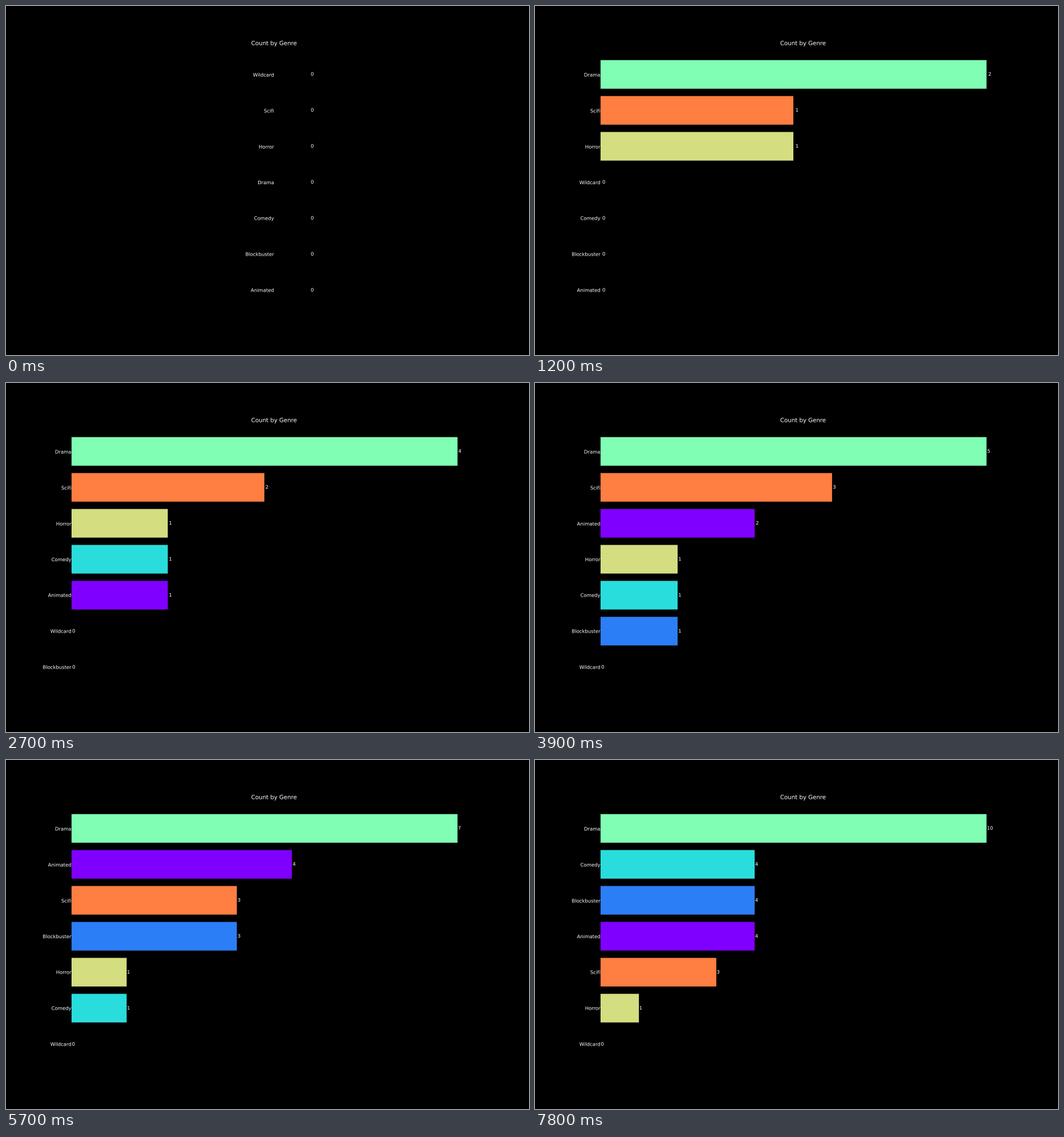
These frames come from a looping animation (917x611 px, 8 s). An HTML page with a canvas:

```html
<!DOCTYPE html>
<html lang="en">
<head>
<meta charset="utf-8">
<title>Count by Genre</title>
<style>
  html, body { margin: 0; width: 100%; height: 100%; overflow: hidden; background: #000; }
  canvas { display: block; width: 100vw; height: 100vh; }
</style>
</head>
<body>
<canvas id="chart" width="917" height="611"></canvas>
<script>
const canvas = document.getElementById('chart');
const view = canvas.getContext('2d');
const FONT = '"DejaVu Sans", Verdana, sans-serif';
const STEP = 300, LOOP = 8000;

// Drawn at double size, then halved for even antialiasing.
const buffer = document.createElement('canvas');
buffer.width = canvas.width * 2;
buffer.height = canvas.height * 2;
const ctx = buffer.getContext('2d');

// Layout in a 1500 x 1000 figure at 100 dpi.
const FIG_W = 1500, FIG_H = 1000, PT = 100 / 72;
const LEFT = 187.5, WIDTH = 1162.5, TOP = 120, HEIGHT = 770;
const ROW = HEIGHT / 7.48, BAR = 0.8 * ROW, FIRST = TOP + 0.74 * ROW;
const MID = LEFT + WIDTH / 2, GAP = 0.01;

const genres = [
  ['Animated', '#8000ff'], ['Blockbuster', '#2c7ef7'], ['Comedy', '#2adddd'],
  ['Drama', '#80ffb4'], ['Horror', '#d4dd80'], ['Scifi', '#ff7e41'], ['Wildcard', '#ff0000']
].map(([name, color]) => ({ name, color }));

// Each step adds one entry, given by the genre's initial.
const ENTRIES = 'DSDHCDSADSADBADBADBBDCDCDC';

function ranking(step) {
  const seen = ENTRIES.slice(0, step);
  return genres
    .map(g => ({ ...g, count: seen.split(g.name[0]).length - 1 }))
    .reverse()
    .sort((a, b) => b.count - a.count);
}

function text(str, x, y, align, points = 10) {
  ctx.font = `${points * PT}px ${FONT}`;
  ctx.textRendering = 'geometricPrecision';
  ctx.letterSpacing = '0.01px'; // keeps "fi" from joining
  ctx.textAlign = align;
  ctx.fillStyle = '#fff';
  ctx.fillText(str, x, Math.round(y));
}

function bar(x0, x1, y0, y1, color) {
  const [l, r, t, b] = [x0, x1, y0, y1].map(Math.round);
  ctx.fillStyle = color;
  ctx.fillRect(l, t, r - l, b - t);
}

function draw(step) {
  const rows = ranking(step);
  const max = rows[0].count;
  const zero = max ? LEFT : MID;
  const unit = max ? WIDTH / 1.05 / max : WIDTH / 0.11;

  ctx.setTransform(buffer.width / FIG_W, 0, 0, buffer.height / FIG_H, 0, 0);
  ctx.fillStyle = '#000';
  ctx.fillRect(0, 0, FIG_W, FIG_H);

  text('Count by Genre', MID, TOP - 6 * PT, 'center', 12);
  rows.forEach(({ name, color, count }, i) => {
    const y = FIRST + i * ROW;
    const end = zero + count * unit;
    if (count) bar(zero, end, y - BAR / 2, y + BAR / 2, color);
    text(name, zero, y + 5.5, 'right');
    text(count, Math.round(end + GAP * unit), y + 4, 'left');
  });

  view.drawImage(buffer, 0, 0, canvas.width, canvas.height);
}

const start = performance.now();
let shown = -1;

function tick() {
  const t = (performance.now() - start) % LOOP;
  const step = Math.min(Math.floor(t / STEP), ENTRIES.length);
  if (step !== shown) draw(shown = step);
  requestAnimationFrame(tick);
}
tick();
</script>
</body>
</html>
```
